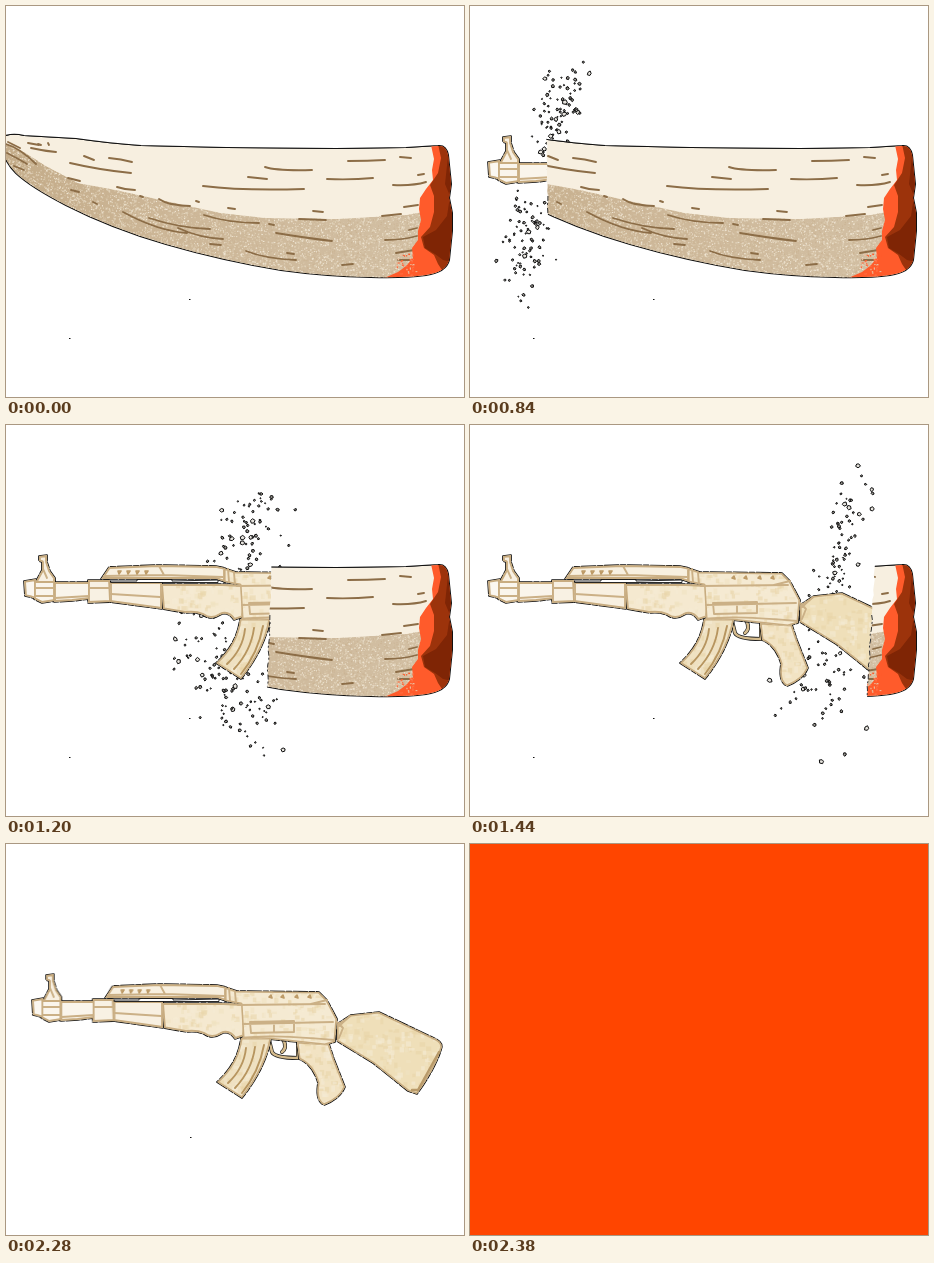
These frames come from a looping animation (458 by 391 pixels, 2780 ms). An HTML page with a canvas:

```html
<!DOCTYPE html>
<html lang="en">
<head>
<meta charset="utf-8">
<title>Tusk</title>
<style>
html, body { margin: 0; width: 100%; height: 100%; overflow: hidden; background: #fff; }
canvas { display: block; }
</style>
</head>
<body>
<canvas id="stage" width="458" height="391"></canvas>
<script>
const W = 458, H = 391, LOOP = 2780, STEP = 60;
const stage = document.getElementById('stage').getContext('2d');
const P = d => new Path2D(d);

function random(seed) {
  let s = seed * 7919 + 17;
  return () => {
    s = (s + 0x6D2B79F5) | 0;
    let n = Math.imul(s ^ (s >>> 15), 1 | s);
    n = (n + Math.imul(n ^ (n >>> 7), 61 | n)) ^ n;
    return ((n ^ (n >>> 14)) >>> 0) / 4294967296;
  };
}

function layer(paint) {
  const c = document.createElement('canvas');
  c.width = W;
  c.height = H;
  const g = c.getContext('2d');
  g.lineJoin = g.lineCap = 'round';
  paint(g);
  return c;
}

function line(g, path, color, width) {
  g.strokeStyle = color;
  g.lineWidth = width;
  g.stroke(path);
}

function fill(g, path, color) {
  g.fillStyle = color;
  g.fill(path);
}

function inside(g, path, paint) {
  g.save();
  g.clip(path);
  paint();
  g.restore();
}

// Mottled paint: random flecks within a box
function fleck(g, seed, count, [x, y, w, h], colors, size) {
  const r = random(seed);
  for (let i = 0; i < count; i++) {
    g.fillStyle = colors[Math.floor(r() * colors.length)];
    g.fillRect(x + r() * w, y + r() * h, size * (.6 + r()), size * (.6 + r()));
  }
}

const tuskShape = P('M-3 131Q6 127 18 130L70 133Q105 138 135 140L220 142L330 143L400 142L432 140Q440 139 442 149L445 178L443 192L446 207L446 225L443 254Q440 266 420 269Q398 272 365 271Q318 270 275 264Q215 254 160 238Q105 222 60 199Q25 181 10 167Q0 157 -3 145Z');
const tuskShade = P('M-4 136L18 146L40 160L72 177L110 184L160 195L215 207L260 212L330 213L400 209L416 206L440 280L-4 280Z');
const tuskFlesh = P('M425 139L428 153L426 164L427 174L420 183L414 192L413 203L415 214L412 225L412 234L406 242L407 252L400 260L392 266L376 273L450 273L450 135Z');
const tuskCore = P('M432 138L435 152L432 167L424 179L428 190L428 206L424 221L415 231L418 242L428 249L432 258L438 267L450 267L450 135Z');
const tuskDark = P('M442 150L439 178L444 190L441 210L430 224L417 231L419 242L429 248L437 254L446 256L450 150Z');
const grainTop = P('M78 150l10 4M103 152q12 1 23 4M64 157q30 7 61 10M62 172l12 3M65 184l8 2M111 181q9 3 18 3M134 190l3 1M153 193q6 4 12 5M166 198q9 2 18 2M190 195l3 1M222 202l7 1M197 180q40 5 101 3M242 171l19 2M259 161q12 4 47 3M342 155q20 0 37-1M321 173q24 1 46-1M394 151l11 1M387 179q20 1 33-3M412 169l6-1M376 210l19-2M398 201l14-2M22 137l11 2M25 142q13 3 25 4M32 138l3 1M42 137l1 2');
const grainLow = P('M307 205l10 1M293 213l27 1M379 234q18 0 32-4M403 224l8-2M270 227q30 5 56 8M198 209q24 8 55 8M263 218l5 1M117 206q35 19 64 21M143 212q30 10 61 11M172 222q22 10 45 11M204 238l11 1M240 245q20 8 50 9M281 247l7 1M336 259l11-1M390 247l18-3M392 254l12 0M87 196l4 2M0 138q14 4 30 20M1 147q10 5 20 11M2 136l12 6M8 160l10 4');

const tusk = layer(g => {
  line(g, tuskShape, '#111', 2);
  inside(g, tuskShape, () => {
    fill(g, tuskShape, '#f7efe0');
    inside(g, tuskShade, () => {
      const shade = g.createLinearGradient(0, 0, 420, 0);
      shade.addColorStop(0, '#c3ab88');
      shade.addColorStop(.4, '#cdb798');
      shade.addColorStop(1, '#d2bfa3');
      fill(g, tuskShade, shade);
      fleck(g, 4, 17000, [0, 135, 420, 140], ['#efe5d3', '#e3d5bd', '#cbb494', '#d9c8ac'], 1);
    });
    line(g, grainTop, '#8c6d47', 1.9);
    line(g, grainLow, '#8c6d47', 1.8);
    fill(g, tuskFlesh, '#ff5b2b');
    fleck(g, 9, 60, [390, 246, 20, 26], ['#ff6d40', '#e9bfa0', '#ff5b2b'], 1.5);
    fill(g, tuskCore, '#9c330b');
    fill(g, tuskDark, '#7f2505');
  });
});

const gunParts = [
  ['M33 131L41 130L41 137L44 146L49 153L49 158L29 158L36 145L36 137L33 136Z', '#f8f0e2'],
  ['M48 157L84 157L84 174L66 176L48 177Z', '#faf5eb'],
  ['M18 156L30 154L30 174L24 172L19 171Z', '#fbf7f0'],
  ['M28 156L49 156L49 176L36 178L28 174Z', '#faf5ec'],
  ['M104 157L156 157L156 184L104 177Z', '#f8f0e1'],
  ['M82 155L104 155L105 177L82 178Z', '#f8f1e3'],
  ['M95 154L103 142L152 140L210 141L219 143L219 157L210 154L95 154Z', '#f8f0e0'],
  ['M155 159L216 159L237 160L237 192L228 195Q222 186 214 190Q205 196 197 190Q190 187 180 188L157 184Z', '#f5e9d0'],
  ['M344 171L372 168L429 195Q437 199 434 206Q428 225 410 250L401 247L366 219L330 197L330 180Z', '#efdfb9'],
  ['M290 198L322 200L327 215L338 243Q333 255 317 261Q308 257 311 239Q306 221 292 215Z', '#f2e3c3'],
  ['M234 194L264 194Q259 224 235 254L210 238Q231 219 234 194Z', '#efe1c2'],
  ['M218 143L230 147L312 148L320 156L330 175L328 198L318 201L290 198L262 195L236 194L234 160L218 157Z', '#f5ead2']
].map(([d, color]) => [P(d), color]);
const guard = P('M262 196L265 208Q268 214 291 214L291 197M277 197Q280 204 275 208');
const gunLines = P('M30 163L48 163M30 171L48 171M49 173L83 171M37 144L41 153M83 163L104 163M105 169L154 172M98 151L158 150L217 152M153 141L158 150M231 161L318 160M236 180L326 178M243 178L287 177L287 188L244 189ZM267 178L267 188M228 148L229 159M320 156L304 160M222 144L223 157M236 194Q260 190 327 196M330 178L336 184L332 194M343 172L332 182');
const ribs = P('M239 204Q237 224 221 239M248 203Q245 226 228 244M257 201Q252 228 235 249');
const pins = P('M112 146l1 3 2-3ZM121 146l1 3 2-3ZM130 146l1 3 2-3ZM139 146l1 3 2-3ZM262 153l2-2 1 3ZM274 153l2-2 1 3ZM288 153l2-2 1 3ZM301 153l2-2 1 3Z');
const slot = P('M105 156L131 156L131 154.5L166 154.5L166 156L212 155L212 157.5L105 157.5Z');

const gun = layer(g => {
  line(g, guard, '#222', 4);
  line(g, guard, '#d5bb8c', 2.6);
  g.setLineDash([14, 2, 5, 2]);
  gunParts.forEach(([path]) => line(g, path, '#111', 1.7));
  g.setLineDash([]);
  gunParts.forEach(([path, color], i) => inside(g, path, () => {
    fill(g, path, color);
    if (i > 6) {
      fleck(g, i, 900, [155, 145, 285, 118], ['#f6ecd499', '#e9d5a888', '#f1e3c299'], 4);
    }
    line(g, path, '#c8ac80', i > 7 ? 3.2 : 3.8);
  }));
  line(g, gunLines, '#cbb086', 1.9);
  line(g, ribs, '#b7955f', 1.9);
  line(g, pins, '#bd9a66', 1.6);
  fill(g, slot, '#fff');
  line(g, slot, '#111', .9);
  line(g, P('M405 246L411 246L432 208'), '#b99a69', 2.4);
});

// time, cut x, cut lean, then x, y, spread x, spread y, lean, count of the upper and lower dust
const keys = [
  [600, 4, -1, 12, 120, 7, 14, .3, 14, 2, 195, 9, 18, .1, 14],
  [840, 77, -2, 88, 108, 9, 25, .3, 90, 57, 225, 12, 30, .12, 84],
  [1200, 266, 5, 244, 118, 17, 25, .1, 80, 224, 252, 19, 38, -.35, 120],
  [1440, 405, 8, 371, 122, 9, 30, .3, 72, 348, 254, 22, 32, -.1, 60],
  [1620, 451, 8, 430, 200, 6, 6, 0, 0, 432, 250, 9, 17, 0, 8]
];

function stateAt(t) {
  let i = 0;
  while (i < keys.length - 2 && t > keys[i + 1][0]) i++;
  const a = keys[i], b = keys[i + 1], k = (t - a[0]) / (b[0] - a[0]);
  return a.map((v, j) => v + (b[j] - v) * k);
}

function dust([x, y, sx, sy, lean, count], seed, upper) {
  const r = random(seed);
  const normal = () => (r() + r() + r() + r() - 2) * 1.75;
  for (let i = 0; i < count; i++) {
    const big = r() < .12, reach = big ? 1.4 : 1;
    const dy = normal() * sy * reach, py = y + dy;
    const px = x + normal() * sx * reach - lean * dy;
    const size = big ? 2.3 : .6 + r() * 1.1, turn = r() * 6;
    if (upper ? py > 178 : py < 183) continue;
    stage.beginPath();
    for (let n = 0; n < 5; n++) {
      const a = turn + n * Math.PI * .4, d = size * (.7 + r() * .5);
      stage.lineTo(px + Math.cos(a) * d, py + Math.sin(a) * d);
    }
    stage.closePath();
    stage.fillStyle = big ? '#e8e5df' : '#9a9791';
    stage.fill();
    stage.strokeStyle = '#0c0c0c';
    stage.lineWidth = 1;
    stage.stroke();
  }
}

function speck(x, y) {
  stage.fillStyle = '#111';
  stage.fillRect(x, y, 1.5, 1);
}

function clipped(image, points) {
  stage.save();
  stage.beginPath();
  points.forEach(([x, y]) => stage.lineTo(x, y));
  stage.clip();
  stage.drawImage(image, 0, 0);
  stage.restore();
}

function carve(t) {
  const n = Math.floor((t - 600) / STEP);
  const s = stateAt(600 + n * STEP), r = random(n + 50);
  dust(s.slice(3, 9), n + 1, true);
  dust(s.slice(9), n + 101, false);
  const edge = [];
  for (let y = 120; y <= 290; y += 5) {
    edge.push([s[1] - s[2] * (y - 142) / 128 + (r() - .5) * 1.6, y]);
  }
  clipped(gun, [[0, 120], ...edge, [0, 290]]);
  clipped(tusk, [[W, 120], ...edge, [W, 290]]);

  // the shaded part of the cut is outlined
  stage.save();
  stage.clip(tuskShape);
  stage.beginPath();
  edge.filter(([, y]) => y > 185).forEach(([x, y]) => stage.lineTo(x, y));
  stage.setLineDash([5, 2, 2, 3]);
  stage.strokeStyle = '#333';
  stage.lineWidth = 1;
  stage.stroke();
  stage.restore();
}

function recoil(shift, squeeze) {
  const joint = 155, left = shift + squeeze;
  stage.drawImage(gun, joint, 0, W - joint, H, joint + shift, 0, W - joint, H);
  stage.drawImage(gun, 16, 0, joint - 16, H, 16 + left, 0, joint - 16 - squeeze, H);
  speck(183 + shift, 293);
}

function draw(t) {
  stage.fillStyle = t < 2380 ? '#fff' : '#ff4500';
  stage.fillRect(0, 0, W, H);
  if (t >= 2380) return;
  if (t >= 2340) return recoil(2, 12);
  if (t >= 2280) return recoil(1, 7);
  speck(183, 293);
  speck(63, 332);
  if (t < 600) stage.drawImage(tusk, 0, 0);
  else if (t < 1680) carve(t);
  else stage.drawImage(gun, 0, 0);
}

const start = performance.now();
function tick() {
  draw((performance.now() - start) % LOOP);
  requestAnimationFrame(tick);
}
tick();
</script>
</body>
</html>
```
